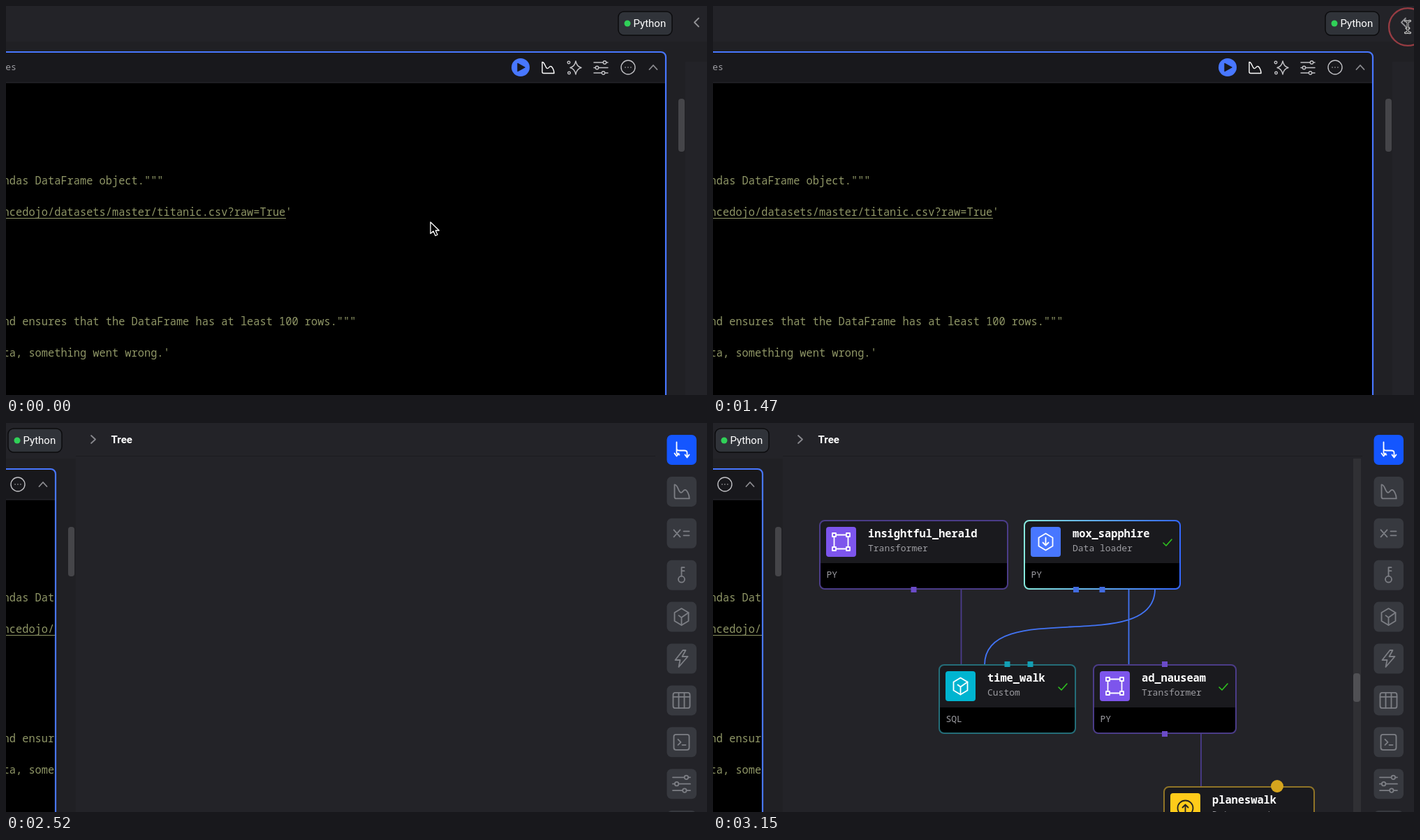
Animation of 1004x558 px, one loop 3220 ms. Source, as an HTML page:

```html
<!DOCTYPE html>
<html lang="en">
<head>
<meta charset="utf-8">
<title>Notebook side panel</title>
<style>
html, body { margin: 0; width: 100%; height: 100%; overflow: hidden; background: #202024; }
svg { display: block; }
.line { fill: none; stroke-width: 1.8; stroke-linecap: round; stroke-linejoin: round; }
.thin { stroke-width: 1.4; }
.ui { font: 500 15px Roboto, sans-serif; fill: #fff; }
.mono { font: 15.33px "Noto Sans Mono", "DejaVu Sans Mono", monospace; white-space: pre; }
.small { font-size: 13px; fill: #9d9da2; }
.title { font-weight: 700; fill: #fff; }
</style>
</head>
<body>
<svg id="stage" width="1004" height="558" viewBox="0 0 1004 558">
  <defs>
    <!-- icons are centred on 0,0 -->
    <g id="chart"><path d="M-8 -8V6Q-8 8 -6 8H9C9 3 6 -2 4 -2C2 -2 1 2 -1 1C-4 0 -4 -8 -8 -8Z"/></g>
    <g id="sliders">
      <path d="M-10 -7.5H3M8 -7.5H10M-10 0H-8M-3 0H10M-10 7.5H1M6 7.5H10"/>
      <circle cx="5.5" cy="-7.5" r="2.2"/><circle cx="-5.5" r="2.2"/><circle cx="3.5" cy="7.5" r="2.2"/>
    </g>
    <g id="hex"><path d="M0 -12L10 -6V6L0 12L-10 6V-6Z"/></g>
    <g id="cube"><use href="#hex"/><path d="M0 12V1L10 -6M0 1L-4 -2"/></g>
    <g id="loader"><use href="#hex"/><path d="M0 -6V5M-4 1L0 5L4 1"/></g>
    <g id="frame">
      <path d="M-7 -10H7M-7 10H7M-10 -7V7M10 -7V7"/>
      <path d="M-12.5 -12.5h5v5h-5zM7.5 -12.5h5v5h-5zM-12.5 7.5h5v5h-5zM7.5 7.5h5v5h-5z"/>
    </g>
    <g id="upload"><circle r="11"/><path d="M0 6V-5M-4 -1L0 -5L4 -1"/></g>
    <g id="branch"><path d="M-7 -11V3Q-7 7 -3 7M-7 -2Q-7 1 -3 1H4Q8 1 8 4V10M-10 5L-7 9L-4 5M5 7L8 11L11 7"/></g>
    <g id="vars"><path d="M-11 -5L-2 5M-2 -5L-11 5M3 -3H11M3 3H11"/></g>
    <g id="key"><circle cy="6" r="4.5"/><path d="M0 1.5V-11H4M0 -6H4"/></g>
    <g id="bolt"><path d="M2 -12L-9 2H-2L-4 12L9 -3H1L6 -12Z"/></g>
    <g id="table"><rect x="-12" y="-11" width="24" height="22" rx="3"/><path d="M-12 -5H12M-4 -11V11M4 -11V11"/></g>
    <g id="terminal"><rect x="-11" y="-11" width="22" height="22" rx="3"/><path d="M-5 -4L-1 0L-5 4M1 4H6"/></g>
    <linearGradient id="glow"><stop stop-color="#86e8dc"/><stop offset="1" stop-color="#3468ff"/></linearGradient>
  </defs>

  <path d="M0 0H1004V51H0ZM973 80H1004V558H973Z" fill="#232328"/>

  <g id="pane">
    <rect x="877" y="8" width="77" height="34" rx="8" fill="#303339" stroke="#0b0b0d" stroke-width="1.5"/>
    <circle cx="890" cy="25" r="4.5" fill="#30d158"/>
    <text class="ui" x="898.5" y="30" style="font-weight:400">Python</text>
    <rect x="963" y="133" width="9" height="76" rx="4" fill="#454549" id="thumb"/>
    <rect x="-30" y="66" width="975" height="600" rx="7"/>
    <path d="M-30 66H938Q945 66 945 73V110H-30Z" fill="#18181c"/>
    <path d="M-30 110H945" stroke="#2d2d33"/>
    <rect x="-30" y="66" width="975" height="600" rx="7" fill="none" stroke="#4877ff" stroke-width="2.2"/>
  </g>

  <svg id="code" width="943" height="558">
    <g class="mono" fill="#8f9666">
      <text x="-4.4" y="256">ndas DataFrame object."""</text>
      <text x="-4.4" y="301">ncedojo/datasets/master/titanic.csv?raw=True'</text>
      <path d="M0 304.5H401" stroke="#8f9666"/>
      <text x="-4.4" y="458">nd ensures that the DataFrame has at least 100 rows."""</text>
      <text x="-4.4" y="503">ta, something went wrong.'</text>
    </g>
  </svg>
  <text id="label" class="mono small" x="-.7" y="92">es</text>

  <svg id="bar" width="1004" height="558">
    <g id="tools" class="line thin" stroke="#c0c0c4">
      <circle cx="737" cy="88" r="13" fill="#4877ff" stroke="none"/>
      <path d="M733 82.5L743 88L733 93.5Z" fill="#18181c" stroke="#18181c"/>
      <use href="#chart" x="776" y="88.5" stroke="#fff"/>
      <path d="M816 79Q817.5 87 824 88.5Q817.5 90 816 98Q814.5 90 808 88.5Q814.5 87 816 79Z"/>
      <circle cx="806" cy="81" r="1.8"/><circle cx="806.5" cy="96" r="1.8"/>
      <use href="#sliders" x="852" y="88.5"/>
      <circle cx="891" cy="88" r="10"/>
      <path d="M887 88h.1M890.9 88h.1M894.9 88h.1"/>
      <path d="M921.5 91L927 85L932.5 91" stroke="#8c8c91" stroke-width="1.8"/>
    </g>
  </svg>

  <path id="opener" class="line" d="M992 17.5L986 23.5L992 29.5" stroke="#929296"/>

  <g id="panel">
    <path d="M100 0H1004V558H100Z" fill="#232328"/>
    <path d="M100 47.5H930" stroke="#1c1c20"/>
    <path class="line" d="M122 18L128 23.5L122 29" stroke="#88888d" stroke-width="2"/>
    <text class="ui" x="150.5" y="28.5" style="font-weight:700">Tree</text>
    <g id="tree">
      <rect x="917" y="51" width="11" height="520" fill="#303034"/>
      <rect x="917" y="359" width="10" height="41" rx="4" fill="#505054"/>
      <g class="line" stroke-width="2">
        <path d="M355.5 238V347M699 446V522" stroke="#4b3c8c"/>
        <path d="M595.5 238V347M633 238C633 335 389 250 389 347" stroke="#4274f5"/>
      </g>
      <g id="nodes"></g>
      <circle id="dot" cx="808" cy="521" r="9" fill="#d6a51e"/>
    </g>
    <g id="side"></g>
  </g>

  <circle id="ring" fill="none" stroke="#a03f45"/>
  <path id="arrow" d="M0 0V16.5L4 13L7 19.5L10 18L7.2 12H12.3Z" stroke="#fff" stroke-width="1.3" stroke-linejoin="round"/>
  <g id="beam" class="line" transform="translate(995 30)">
    <path id="stem" d="M-3.5 -8.5Q0 -8.5 0 -6V6Q0 8.5 -3.5 8.5M3.5 -8.5Q0 -8.5 0 -6M0 6Q0 8.5 3.5 8.5M-2 2H2" stroke="#fff" stroke-width="2.8"/>
    <path d="M-3.5 -8.5Q0 -8.5 0 -6V6Q0 8.5 -3.5 8.5M3.5 -8.5Q0 -8.5 0 -6M0 6Q0 8.5 3.5 8.5M-2 2H2" stroke="#111" stroke-width="1.2"/>
  </g>
</svg>

<script>
const LOOP = 3220, STEP = 70, SHIFT = -874;
const OPEN = 2240, REFLOW = 2310, LOAD = 2520, LOADED = 3080;
const $ = id => document.getElementById(id);
const set = (id, attrs) => { for (const k in attrs) $(id).setAttribute(k, attrs[k]); };
const show = (id, on) => { $(id).style.display = on ? "" : "none"; };
const clamp = u => Math.min(1, Math.max(0, u));
const mix = (a, b, u) => a + (b - a) * u;
const easeOut = u => 1 - (1 - u) ** 2;
const smooth = u => u * u * (3 - 2 * u);

function node(x, y, w, name, kind, lang, icon, fill, border, check) {
  const tick = check ? `<path class="line" stroke="#2fc21f" style="stroke-width:1.6"
    d="M${x + w - 24} ${y + 32}l4 4 8 -9"/>` : "";
  return `<rect x="${x}" y="${y}" width="${w}" height="98" rx="7" fill="#1a1a1e"/>
    <path d="M${x} ${y + 61}h${w}v30q0 7 -7 7h${14 - w}q-7 0 -7 -7z"/>
    <rect x="${x}" y="${y}" width="${w}" height="98" rx="7" fill="none" stroke="${border}" stroke-width="2"/>
    <rect x="${x + 9}" y="${y + 9}" width="43" height="43" rx="4" fill="${fill}"/>
    <use class="line" href="#${icon}" x="${x + 30.5}" y="${y + 30.5}" stroke="${icon === "upload" ? "#222" : "#fff"}"/>
    <text class="mono title" x="${x + 69}" y="${y + 24}">${name}</text>
    <text class="mono small" x="${x + 69}" y="${y + 44}">${kind}</text>
    <text class="mono small" x="${x + 9.5}" y="${y + 82}">${lang}</text>${tick}`;
}
const port = (x, y, fill) => `<rect x="${x - 4}" y="${y - 4}" width="8" height="8" fill="${fill}"/>`;

const violet = "#7d55ec", dim = "#4b3c88", blue = "#4877ff", cyan = "#00b4d0";
$("nodes").innerHTML =
  node(153, 140, 269, "insightful_herald", "Transformer", "PY", "frame", violet, dim) +
  node(446, 140, 223, "mox_sapphire", "Data loader", "PY", "loader", blue, "url(#glow)", true) +
  node(324, 347, 195, "time_walk", "Custom", "SQL", "cube", cyan, "#246d78", true) +
  node(545, 347, 204, "ad_nauseam", "Transformer", "PY", "frame", violet, dim, true) +
  node(646, 522, 215, "planeswalk", "Data exporter", "PY", "upload", "#ffcb1a", "#8f7427") +
  port(287.5, 239, "#6b4bc8") + port(520, 239, "#416be0") + port(557.5, 239, "#416be0") +
  port(421.5, 346, "#139fb4") + port(454.5, 346, "#139fb4") +
  port(647, 346, "#6b4bc8") + port(647, 446, "#6b4bc8");

$("side").innerHTML = ["branch", "chart", "vars", "key", "cube", "bolt", "table", "terminal", "sliders", "hex"]
  .map((icon, i) => {
    const y = 17 + i * 59.9, scale = /chart|sliders/.test(icon) ? 1.25 : 1;
    return `<rect x="946.5" y="${y}" width="42.5" height="43" rx="7" fill="${i ? "#37393f" : "#1456ff"}"/>
      <use class="line" href="#${icon}" transform="translate(967.5 ${y + 21.5}) scale(${scale})"
        stroke="${i ? "#7d7f85" : "#fff"}" style="stroke-width:${1.8 / scale}"/>`;
  }).join("");

function pointer(t) {
  if (t < 840) {
    const u = smooth(clamp(t / 420));
    return [mix(608, 1008, u), mix(310, 2, u)];
  }
  if (t < 1400) {
    const u = clamp((t - 840) / 140), v = clamp((t - 980) / 280);
    return [mix(1001, 997, u) - 3 * v, mix(15, 20, u) + 4 * v];
  }
  return [994.5 + 14 * clamp((t - 2380) / 140), 25];
}

function click(t) {
  const second = t >= 2030;
  const u = (t - (second ? 2030 : 1330)) / 420;
  show("ring", u > 0 && u < 1);
  set("ring", {
    cx: 995, cy: second ? 27.5 : 30,
    r: 15.8 + 20 * easeOut(clamp(u)),
    "stroke-width": mix(3.2, .6, clamp(u)),
    opacity: clamp(1.4 - 1.4 * u)
  });
}

function draw(t) {
  const open = t >= OPEN, reflow = t >= REFLOW;
  set("pane", { transform: `translate(${open ? SHIFT : 0})` });
  set("thumb", { y: open ? 149 : 133, height: open ? 71 : 76 });
  set("code", { width: open ? 70 : 943 });
  set("bar", { width: open ? 90 : 1004 });
  set("tools", { transform: `translate(${reflow ? SHIFT : open ? -692.5 : 0})` });
  show("label", !reflow);
  show("opener", t < 2100);
  show("panel", open);
  show("side", reflow);
  set("tree", { opacity: easeOut(clamp((t - LOAD) / (LOADED - LOAD))) });
  const drift = 4 * clamp((3150 - t) / 420);
  set("dot", { cx: 808 + drift, cy: 521 + drift });

  const beam = t >= 1400 && t < 2030;
  show("beam", beam);
  show("arrow", !beam && t < LOAD);
  set("arrow", { transform: `translate(${pointer(t)})` });
  click(t);
}

function tick(now) {
  draw(Math.floor(now % LOOP / STEP) * STEP);
  requestAnimationFrame(tick);
}
// the bar is drawn above the panel's left edge
$("stage").insertBefore($("panel"), $("bar"));
draw(0);
requestAnimationFrame(tick);
</script>
</body>
</html>
```
